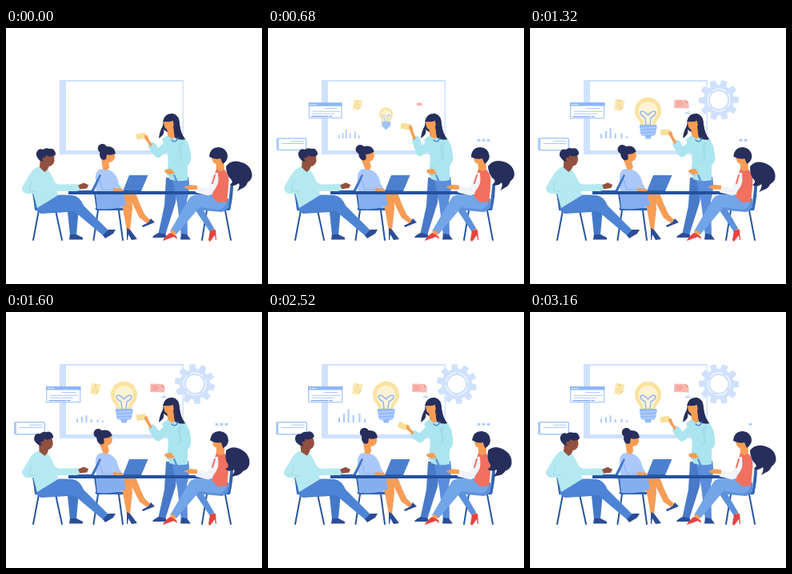
An HTML page for the animation above (3.2 s loop, 320x320 px).

```html
<!DOCTYPE html>
<html lang="en">
<head>
<meta charset="utf-8">
<title>Team meeting</title>
<style>
html, body { margin: 0; width: 100%; height: 100%; overflow: hidden; background: #fff; }
svg { display: block; width: 100%; height: 100%; }
.line { fill: none; stroke-linecap: round; stroke-linejoin: round; }
.pale { fill: #cfe1fd; }
.soft { fill: #a9c9fc; }
.navy { fill: #262e5c; }
.shoe { fill: #2b4d98; }
.skin { fill: #f79d55; }
.brown { fill: #92513f; }
.shirt { fill: #b5e9f1; }
.chair { stroke: #28579f; stroke-width: 2; }
</style>
</head>
<body>
<svg viewBox="0 0 320 320">
  <!-- board -->
  <path class="pale" d="M67 65H222V158H67ZM75 67V153H220.5V67Z" fill-rule="evenodd"/>

  <!-- items on and around the board -->
  <g id="gear"></g>
  <g id="panel">
    <rect x="50.7" y="93.7" width="42" height="19" fill="#fff" stroke="#a9c9fc" stroke-width="1.3"/>
    <path d="M50 93H93.4V97.5H50Z" fill="#8db6fa"/>
    <path class="line" d="M52.500 95.300h1M55.500 95.300h1M58.500 95.300h1" stroke="#fff" stroke-width="1.2"/>
    <path class="line" d="M70 100.500H87M55 104.300H90M55 107.300H83" stroke="#a9c9fc"/>
    <path class="line" d="M54 110.700H75M77 110.700H80" stroke="#7aa8f3" stroke-width="1.3"/>
  </g>
  <g id="bubble">
    <rect x="10.800" y="137.800" width="37.500" height="15" rx="1.500" fill="#fff" stroke="#a9c9fc" stroke-width="1.600"/>
    <path class="soft" d="M10 138H13V152H10Z"/>
    <path class="line" d="M29 141.300H45M17 144.500H45" stroke="#a9c9fc" stroke-width="1.100"/>
  </g>
  <g id="sticky">
    <path d="M107 88.500L118.500 90.500L117 99L112 103.500L105 102Z" fill="#fbe9b2"/>
    <path d="M112 103.500L113 98.500L117 99Z" fill="#f0d58a"/>
    <path class="line" d="M109 95L114 96M108.500 98L111 98.500" stroke="#e6cc88" stroke-width=".8"/>
    <circle cx="112" cy="91.500" r="1" fill="#d9bd74"/>
  </g>
  <g id="note">
    <path d="M180.500 89.500L195 90L198.500 94V100.500L180 100Z" fill="#f9b9b3"/>
    <path d="M195 90V94H198.500Z" fill="#ee928c"/>
    <path class="line" d="M183 92.500H189M183 94.800H191M183 97.200H189" stroke="#ec8f88" stroke-width=".9"/>
  </g>
  <path id="mark" class="line" d="M194 106.500H201M196 105.500L199 104" stroke="#a9c9fc" stroke-width="1"/>
  <g id="bulb">
    <path d="M139 122Q138 117 134.500 113.500A16.500 16.500 0 1 1 160.500 113.500Q157 117 156 122Z" fill="#fae3a0"/>
    <path d="M142 120Q141 115 138 111.500A12 12 0 1 1 157 111.500Q154 115 153 120Z" fill="#fdf3d4"/>
    <path class="line" d="M145 121L144 112Q136 108 138.500 104.500Q142 103 147.500 109Q153 103 156.500 104.500Q159 108 151 112L150 121" stroke="#83aef5" stroke-width="1.300"/>
    <path d="M137 121H158.500V125L157.500 128V131L155.500 134.500H152L150.500 138.500H145L143 134.500H139.500L138 131V128L137 125Z" fill="#94bbfa"/>
    <path class="line" d="M138 125.300L157 124.300M139 129.300L157 128.300M140 133L156 132" stroke="#c9ddfd" stroke-width=".9"/>
  </g>
  <g id="bars" class="soft"></g>
  <g id="dots" class="soft"></g>

  <!-- chairs -->
  <path class="line chair" d="M32 195Q36 205 37 227H71M41 228L34 265M62 228L70 265M111 206L114 227H148M115 228L109.500 265M141 228L146 265M283 194Q283 212 279 227H247M251 228L245 265M274 228L281 265"/>
  <path class="line" d="M33 196L37.500 226H68M113 226H145M282 196L279 226H250" stroke="#3466b3" stroke-width="3"/>

  <!-- standing woman -->
  <path d="M200 187H215L212 218L199 259H190L198 222Z" fill="#4979c9"/>
  <path d="M207 186H228Q231 200 226 216L227 260H219L214 219Z" fill="#5a8edc"/>
  <path class="shoe" d="M191 256L200 258V262H183Q184 259 191 256ZM219 257L226 258L231 264.500H218Z"/>
  <path d="M195 140Q201 132 212 134L225 139Q230 149 231.500 163Q231 168 227 172V190Q216 193 204 189L202 173Q204 162 200 151Z" fill="#abe5ef"/>
  <path class="line" d="M220 148Q224 162 220 167L205 180" stroke="#a0dce9" stroke-width="10"/>
  <path class="line" d="M224 149Q227 164 222 168L210 176" stroke="#abe5ef" stroke-width="11"/>
  <path class="skin" d="M207 176L211 182L204 183L198 180L199 177Z"/>
  <path id="upperArm" class="line" stroke="#abe5ef" stroke-width="10"/>
  <path id="wrist" class="line" stroke="#f79d55" stroke-width="3.500"/>
  <path id="card" d="M-6-3.700H5.500V3.700H-6Z" fill="#f8e09a"/>
  <ellipse id="fingers" class="skin" rx="2.200" ry="3.500"/>
  <path class="navy" d="M197 115Q199 106 209 107Q217 109 217 121Q218 132 224 139Q216 141 210 136L197 127Q199 133 191 138Q192 129 196 122Z"/>
  <path class="skin" d="M201 123H209L211 137Q207 140 202 134Z"/>
  <path class="skin" d="M197 116Q204 119 210 115V121Q208 127 202 127Q197 126 197 116Z"/>
  <path class="navy" d="M196 117Q198 108 207 108Q216 109 217 121Q219 133 224 139Q213 141 210 132Q211 122 208 114Q204 118 196 117Z"/>
  <path class="line" d="M207 140Q212 145 215 137" stroke="#4b7dce" stroke-width="1.300"/>

  <!-- seated man -->
  <path d="M42 212H83Q91 214 91 225L88 259H80L77 230L44 232Q36 230 37 219Z" fill="#4378c8"/>
  <path d="M42 212Q63 207 83 209Q92 210 97 222L128 253L122 260L85 229L44 231Q36 228 37 219Z" fill="#4d84d5"/>
  <path class="shoe" d="M80 258H88L96 262V264.500H79ZM121 259L128 252H137L134 257L124 263Z"/>
  <path class="shirt" d="M42 173Q50 174 53 178Q61 188 65 209L39 225L34 207L25 207Q19 204 20 199L29 184Q34 175 42 173Z"/>
  <path class="line" d="M32 192L29 203L39 205" stroke="#9fd9e6" stroke-width="1"/>
  <g id="manHead">
    <path class="brown" d="M43 162H54V172Q53 177 48 180L42 174Z"/>
    <path class="brown" d="M45 157Q54 154 60 158L60.500 166Q59 173 53 173Q45 171 45 157Z"/>
    <path class="navy" d="M40 163Q36 158 39 154Q41 150 46 152Q50 149 54 151Q59 150 61 154Q64 159 59 160Q54 162 50 159L48 166Q43 168 40 163Z"/>
    <circle class="brown" cx="47.500" cy="164" r="2.200"/>
  </g>

  <!-- seated woman -->
  <path class="skin" d="M139 207H157L158 226L155 253H151L146 226Z"/>
  <path class="skin" d="M146 207H162Q167 221 173 233L181 241L178 245L167 237L157 217Z" stroke="#e98c49" stroke-width=".4"/>
  <path class="shoe" d="M151 250L155 252L164 264L157 265L153 258L152 265H151ZM181 238L186 243L171 249L170 247L178 243Z"/>
  <path d="M112 207H147L150 221Q138 228 114 226Z" fill="#84aeef"/>
  <path d="M116 177Q124 174 132 179Q139 184 141 195L146 203V208H113L112 190Q111 181 116 177Z" fill="#abc8fb"/>
  <path class="line" d="M116 187L121 202H137" stroke="#8db3f3" stroke-width="1.200"/>
  <g id="womanHead">
    <path class="skin" d="M119 163H128L129 174Q127 180 121 176Z"/>
    <path class="skin" d="M122 156H136V162Q134 168 128 168Q122 166 122 156Z"/>
    <circle class="navy" cx="120.500" cy="150.500" r="5.700"/>
    <path class="navy" d="M117 159Q117 148 127 148Q136 148 137 157Q131 160 126 158L125 164Q119 167 117 159Z"/>
  </g>

  <!-- right woman's legs -->
  <path d="M241 212L278 213Q281 227 270 230L247 228L261 252L255 255L237 228Z" fill="#5d91dc"/>
  <path d="M276 214Q276 225 266 227L242 224L213 258L205 254L229 213Q232 208 242 208H260Z" fill="#73a5e9"/>
  <path class="skin" d="M207 252L213 256L210 260L205 258ZM255 253L260 251L261 256L257 257Z"/>
  <path d="M205 256L213 260L214 264L210 261L196 266Q197 262 205 256ZM255 253L262 252L263 265L262 265L261 259L255 267L253 265Z" fill="#e4443f"/>

  <!-- table and laptops -->
  <path d="M78 204H247V208H78Z" fill="#24519d"/>
  <path d="M117 183L119 184L110 204H106Z" fill="#3f75c5"/>
  <path d="M154 184H177.500L169 204H146Z" fill="#4c80ce"/>
  <path d="M137 203H169V205H137ZM88 203H109V205H88Z" fill="#2b5ca9"/>
  <path d="M209 184L211 183L220 204H217Z" fill="#5e91db"/>
  <path class="skin" d="M134 200L145 201L147 204H134Z"/>

  <g id="manArm">
    <path class="line" d="M51 184Q56 198 65 200L89 200" stroke="#b5e9f1" stroke-width="8.500"/>
    <path class="brown" d="M90 197L97 194L103 197L101 201L92 202Z"/>
  </g>

  <!-- right woman's upper body -->
  <path d="M263 176L273 177Q280 184 278 197L276 218L258 212L259 188Z" fill="#f1705f"/>
  <g id="rightArm">
    <path class="line" d="M264 185Q260 198 253 205L240 202" stroke="#f1f3fb" stroke-width="8.500"/>
    <path class="skin" d="M239 197L230 196L222 199L229 202L239 202Z"/>
  </g>
  <path d="M264 177Q274 176 277 183Q279 194 276 217L265 218L257 210Q269 199 264 177Z" fill="#f1705f"/>
  <path class="line" d="M261 184Q259 191 258 194" stroke="#f1705f" stroke-width="2"/>
  <g id="rightHead">
    <path class="skin" d="M262 164H272L273 176Q268 182 263 176Z"/>
    <path class="skin" d="M257 159H270V165Q266 172 260 169Q257 166 257 159Z"/>
    <path class="navy" d="M254 161Q255 149 266 149Q276 150 277 160Q277 166 271 170L268 163Q262 165 254 161Z"/>
  </g>
  <path id="ponytail" class="navy" d="M275 173Q281 165 291 167Q306 170 307.500 183Q308 189 302 193Q300 199 294 201L289 204Q293 197 291 194Q285 199 280 196Q286 192 279 187Q275 180 275 173Z"/>
</svg>
<script>
const LOOP = 3200;
const $ = id => document.getElementById(id);
const set = (id, name, value) => $(id).setAttribute(name, value);
const clamp = x => Math.max(0, Math.min(1, x));
const smooth = x => x * x * (3 - 2 * x);

// Eased value at time t from alternating time/value pairs
function track(t, ...keys) {
  for (let i = 2; i < keys.length; i += 2) {
    if (t <= keys[i]) {
      const p = smooth((t - keys[i - 2]) / (keys[i] - keys[i - 2]));
      return keys[i - 1] + (keys[i + 1] - keys[i - 1]) * p;
    }
  }
  return keys[keys.length - 1];
}

const pops = [
  // id, centre x, centre y, start
  ['panel', 71.5, 103, 150], ['bubble', 29.5, 145, 150],
  ['sticky', 112, 96, 200], ['bulb', 147.5, 113, 370],
  ['note', 189.3, 95.5, 440], ['mark', 198, 105, 650],
  ['bars', 88, 138, 260], ['gear', 236, 90, 700]
];
const barX = [89, 95, 100.5, 106.7, 114.5, 121];
const barLow = [4.5, 6.5, 8.5, 4, 3.5, 2];
const barHigh = [6, 11, 17, 10, 13, 5];

const rects = (xs, y, w, h) => xs.map(x => `<rect x="${x - w / 2}" y="${y}" width="${w}" height="${h}"/>`).join('');
$('bars').innerHTML = rects(barX, 130, 2, 8);
$('dots').innerHTML = rects([263.5, 269.5, 275.5], 139, 3.6, 2.8);

const teeth = Array.from({ length: 10 }, (_, i) =>
  `<path d="M-4.500-17L-3.500-25H3.500L4.500-17Z" transform="rotate(${i * 36})"/>`).join('');
$('gear').innerHTML = `<g transform="translate(236 90)"><g id="wheel" class="pale">${teeth}
  <circle r="19"/><circle r="11" fill="#fff"/>
  <circle r="14" fill="none" stroke="#fff" stroke-width="1" stroke-dasharray="18 4"/></g></g>`;

function turn(id, angle, x, y) {
  set(id, 'transform', `rotate(${angle} ${x} ${y})`);
}

function draw(t) {
  for (const [id, x, y, start] of pops) {
    const s = smooth(clamp((t - start) / 600));
    set(id, 'transform', `translate(${x} ${y}) scale(${s}) translate(${-x} ${-y})`);
    set(id, 'visibility', s > 0.01 ? 'visible' : 'hidden');
  }
  turn('wheel', t * 0.04, 0, 0);

  [...$('bars').children].forEach((bar, i) => {
    const wave = 0.5 + 0.5 * Math.cos((t - 1080 + i * 55) / 1440 * 2 * Math.PI);
    const h = barLow[i] + (barHigh[i] - barLow[i]) * wave;
    bar.setAttribute('y', 138 - h);
    bar.setAttribute('height', h);
  });

  [...$('dots').children].forEach((dot, i) => {
    const phase = t % 1100 - i * 110;
    const on = phase >= 60 && phase < (i === 2 ? 810 : 760);
    dot.setAttribute('visibility', on ? 'visible' : 'hidden');
  });

  turn('manHead', track(t, 0, 0, 1150, 0, 1600, -8, 2080, -12, 2800, -12, 3200, 0), 46, 177);
  turn('womanHead', track(t, 0, 0, 100, 0, 600, -13, 2150, -13, 2480, 0), 123, 174);

  const sway = track(t, 0, 0, 680, -3, 1120, -1, 1600, 15, 2080, 18, 2520, 14, 3200, 0);
  turn('ponytail', sway, 276, 174);
  turn('rightHead', sway / 4, 267, 176);

  const cardX = track(t, 0, 169, 680, 172, 1080, 169.5, 1600, 169, 2080, 168.5, 2520, 168.5, 3200, 169);
  const cardY = track(t, 0, 135, 680, 123, 1080, 129.5, 1600, 131.5, 2080, 142.5, 2520, 142.5, 3200, 134);
  const tilt = track(t, 0, -10, 680, 8, 1080, 2, 1600, -8, 2080, 25, 2520, 25, 3200, -10);
  const hx = cardX + 6.5, hy = cardY + 3;
  const ex = 190, ey = 159 - (135 - cardY) * 0.15;
  const cuffX = hx + (ex - hx) * 0.38, cuffY = hy + (ey - hy) * 0.38;
  set('upperArm', 'd', `M206 142L${ex} ${ey - 2}L${cuffX + 2} ${cuffY + 2}`);
  set('wrist', 'd', `M${cuffX} ${cuffY}L${hx} ${hy}`);
  set('card', 'transform', `translate(${cardX} ${cardY}) rotate(${tilt})`);
  set('fingers', 'transform', `translate(${hx} ${hy - 1}) rotate(-20)`);

  const typing = Math.sin(t / LOOP * 10 * Math.PI);
  turn('manArm', -0.7 - typing * 0.9, 51, 184);
  turn('rightArm', typing * 0.9, 264, 185);
}

const begin = performance.now();
function tick() {
  draw((performance.now() - begin) % LOOP);
  requestAnimationFrame(tick);
}
tick();
</script>
</body>
</html>
```
